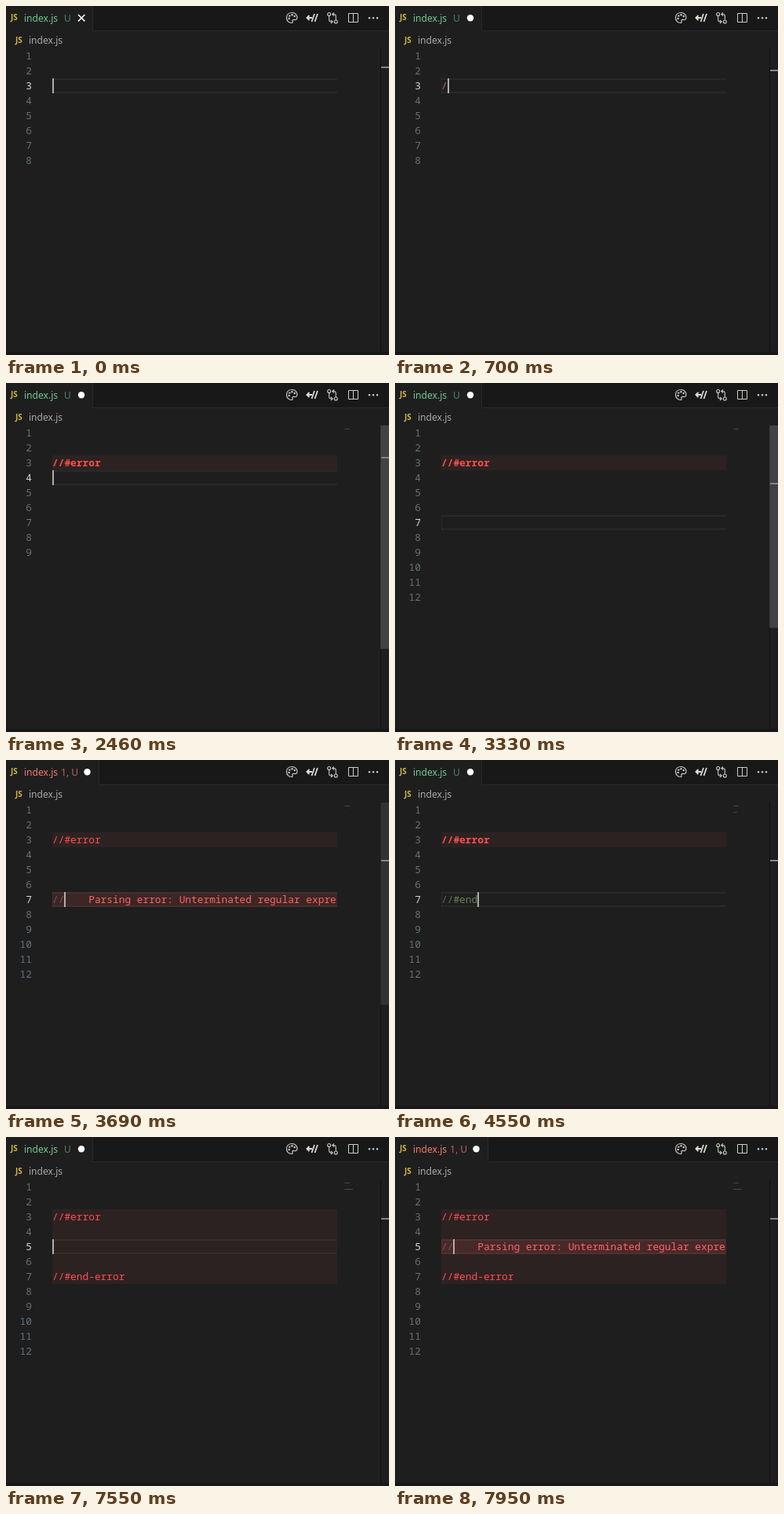
An HTML page with a canvas for the animation above (8 s loop, 488 by 444 pixels).

```html
<!DOCTYPE html>
<html lang="en">
<head>
<meta charset="utf-8">
<title>Editor</title>
<style>
html, body { margin: 0; width: 100%; height: 100%; overflow: hidden; background: #1e1e1e; }
canvas { display: block; }
</style>
</head>
<body>
<canvas id="stage" width="488" height="444"></canvas>
<script>
const ctx = document.getElementById('stage').getContext('2d');
const LOOP = 8000, LEFT = 59, RIGHT = 422, TOP = 54, ROW = 19, CHAR = 7.7, VIEW = 394;
const MONO = '12.83px "Noto Sans Mono", "DejaVu Sans Mono", monospace';
const UI = '12.1px "Noto Sans", "Open Sans", sans-serif';
const MESSAGE = 'Parsing error: Unterminated regular expression';
const RED = '#ff4f4f';

// Each entry changes part of the editor state at the given time.
const events = [
  [0, { line: 3, count: 8, texts: {}, cursor: true }],
  [20, { cursor: false }], [490, { cursor: true }],
  [680, { type: '/', dirty: true }], [750, { error: true }],
  [845, { type: '//' }], [890, { error: false }], [960, { type: '//#' }],
  [1330, { type: '//#e' }], [1490, { type: '//#er' }], [1650, { type: '//#err' }],
  [1750, { type: '//#erro' }], [1860, { type: '//#error', marked: 3, bold: true }],
  [2350, { line: 4, count: 9 }], [2530, { line: 5, count: 10 }],
  [2680, { line: 6, count: 11 }], [2840, { line: 7, count: 12 }],
  [3330, { cursor: false }],
  [3540, { type: '/', cursor: true, bold: false }], [3610, { error: true }],
  [3690, { type: '//' }], [3760, { error: false }], [3870, { type: '//#', bold: true }],
  [4250, { type: '//#e' }], [4370, { type: '//#en' }], [4550, { type: '//#end' }],
  [4880, { type: '//#end-' }], [5140, { type: '//#end-e' }], [5320, { type: '//#end-er' }],
  [5550, { type: '//#end-err' }], [5700, { type: '//#end-erro' }],
  [5780, { type: '//#end-error', marked: 7, bold: false }],
  [6280, { cursor: false }], [6410, { line: 6, cursor: true }], [6570, { line: 5 }],
  [7060, { cursor: false }], [7550, { cursor: true }],
  [7790, { type: '/' }], [7860, { error: true }], [7950, { type: '//' }]
];

function stateAt(t) {
  const s = {};
  for (const [start, change] of events) {
    if (start > t) break;
    Object.assign(s, change);
    if (change.texts) s.texts = {};
    if (change.type) s.texts[s.line] = change.type;
  }
  return s;
}

const rowTop = line => TOP + ROW * (line - 1);

function box(x, y, w, h, color) {
  ctx.fillStyle = color;
  ctx.fillRect(x, y, w, h);
}

function label(text, x, y, color, font, align = 'left') {
  ctx.font = font;
  ctx.fillStyle = color;
  ctx.textAlign = align;
  ctx.fillText(text, x, y);
}

function disc(x, y, r, color) {
  ctx.fillStyle = color;
  ctx.beginPath();
  ctx.arc(x, y, r, 0, Math.PI * 2);
  ctx.fill();
}

function stroke(path, color = '#d0ccc4', width = 1.2) {
  ctx.strokeStyle = color;
  ctx.lineWidth = width;
  ctx.stroke(new Path2D(path));
}

function drawIcons() {
  stroke('M364 21.5C360 21.5 357.5 18.5 357.5 15C357.5 11 360.5 8.5 364.5 8.5C368.5 8.5 371 11.5 371 14.5' +
    'C371 17 369.5 18 367.5 17.5C365.5 17 364.5 18 365 19.5C365.4 20.7 365 21.5 364 21.5Z');
  for (const [x, y] of [[360.7, 16], [361.3, 12.6], [364.5, 11.3], [367.7, 13]]) disc(x, y, 1.2, '#d0ccc4');
  stroke('M383.5 15H390M386.5 12L383.5 15L386.5 18', '#e0ddd6', 1.9);
  stroke('M389.5 20L393 10M393.5 20L397 10', '#e0ddd6', 1.7);
  stroke('M413.7 10.5A2 2 0 1 1 409.7 10.5A2 2 0 1 1 413.7 10.5M422.3 20A2 2 0 1 1 418.3 20A2 2 0 1 1 422.3 20' +
    'M411.7 12.5V17.5Q411.7 20 414.2 20H416M414 17.8L416.2 20L414 22.2' +
    'M420.3 18V13Q420.3 10.5 417.8 10.5H416M418 8.3L415.8 10.5L418 12.7', '#d0ccc4', 1.1);
  stroke('M436.5 9.5H448.5V20.5H436.5ZM442.5 9.5V20.5', '#d0ccc4', 1);
  for (const x of [463, 468, 473]) disc(x, 15.3, 1.2, '#d0ccc4');
}

function drawHeader(s) {
  const width = s.error ? 118 : 110;
  const js = 'bold 10px "Noto Sans", "Open Sans", sans-serif';
  box(0, 0, 488, 32, '#181818');
  box(width, 31, 488 - width, 1, '#292929');
  box(0, 0, width, 32, '#1e1e1e');
  box(width, 0, 1, 32, '#292929');
  label('JS', 6, 18, '#cbb646', js);
  label('index.js', 23, 20, s.error ? '#f47b6e' : '#73c991', UI);
  if (s.error) label('1, U', 70, 19.5, '#b9615a', UI);
  else label('U', 74, 19.5, '#4f8265', UI);
  if (s.dirty) disc(s.error ? 103.5 : 96, 15.3, 4.2, '#fff');
  else stroke('M92 11L100.4 19.4M100.4 11L92 19.4', '#fff', 1.5);
  label('JS', 12, 47, '#cbb646', js);
  label('index.js', 29, 48, '#a9a9a9', UI);
  drawIcons();
}

function drawScrollbar(s, t) {
  const scale = VIEW / (VIEW + ROW * (s.count - 1));
  box(477, TOP, 1, 390, '#111');
  if (t >= 2350 && t < 3870) {
    const fade = Math.min(1, (3870 - t) / 330);
    box(477, TOP, 11, VIEW * scale, `rgba(121,121,121,${0.4 * fade})`);
  }
  const y = t < 680 ? 78 : Math.round(TOP + scale * ROW * (s.line - 1));
  box(478, y - 1, 10, 2, '#868686');
}

function drawCode(s) {
  for (let i = 1; i <= s.count; i++)
    label(i, 33, rowTop(i) + 14, i === s.line ? '#d4d4d4' : '#63717a', MONO, 'right');

  ctx.save();
  ctx.beginPath();
  ctx.rect(LEFT, TOP, RIGHT - LEFT, 390);
  ctx.clip();
  const y = rowTop(s.line);
  if (s.marked) box(LEFT, rowTop(3), RIGHT - LEFT, ROW * (s.marked - 2), '#2d2222');
  if (s.error) box(LEFT, y, RIGHT - LEFT, ROW, 'rgba(228,85,84,0.15)');
  for (const edge of [y, y + ROW - 2]) box(LEFT, edge, RIGHT - LEFT, 2, 'rgba(255,255,255,0.045)');
  stroke(`M${LEFT + 0.5} ${y}V${y + ROW}`, 'rgba(255,255,255,0.045)', 1);

  for (const key in s.texts) {
    const text = s.texts[key], base = rowTop(+key) + 14;
    const tagged = text.endsWith('error');
    if (tagged) {
      label(text, LEFT, base, RED, (s.bold ? '600 ' : '') + MONO);
    } else if (text === '/') {
      label(text, LEFT, base, '#c96464', MONO);
    } else {
      label('//', LEFT, base, s.error ? '#76594f' : '#606d56', MONO);
      label(text.slice(2), LEFT + 2 * CHAR, base, '#688457', MONO);
    }
  }
  const length = (s.texts[s.line] || '').length;
  if (s.error) label(MESSAGE, LEFT + (length + 4) * CHAR, y + 14, '#ff6464', MONO);
  if (s.cursor) box(Math.round(LEFT + length * CHAR), y, 2, ROW, '#aeafad');
  ctx.restore();
}

function drawMinimap(s) {
  for (const key in s.texts) {
    const y = TOP + 2 * (key - 1), length = s.texts[key].length;
    box(430, y, Math.min(2, length), 1, '#2b2b2b');
    box(432, y, Math.max(0, length - 2), 1, '#484646');
  }
}

function draw(now) {
  const t = now % LOOP, s = stateAt(t);
  box(0, 0, 488, 444, '#1e1e1e');
  drawHeader(s);
  drawCode(s);
  drawMinimap(s);
  drawScrollbar(s, t);
  box(0, 440, 488, 4, '#181818');
  requestAnimationFrame(draw);
}
requestAnimationFrame(draw);
</script>
</body>
</html>
```
